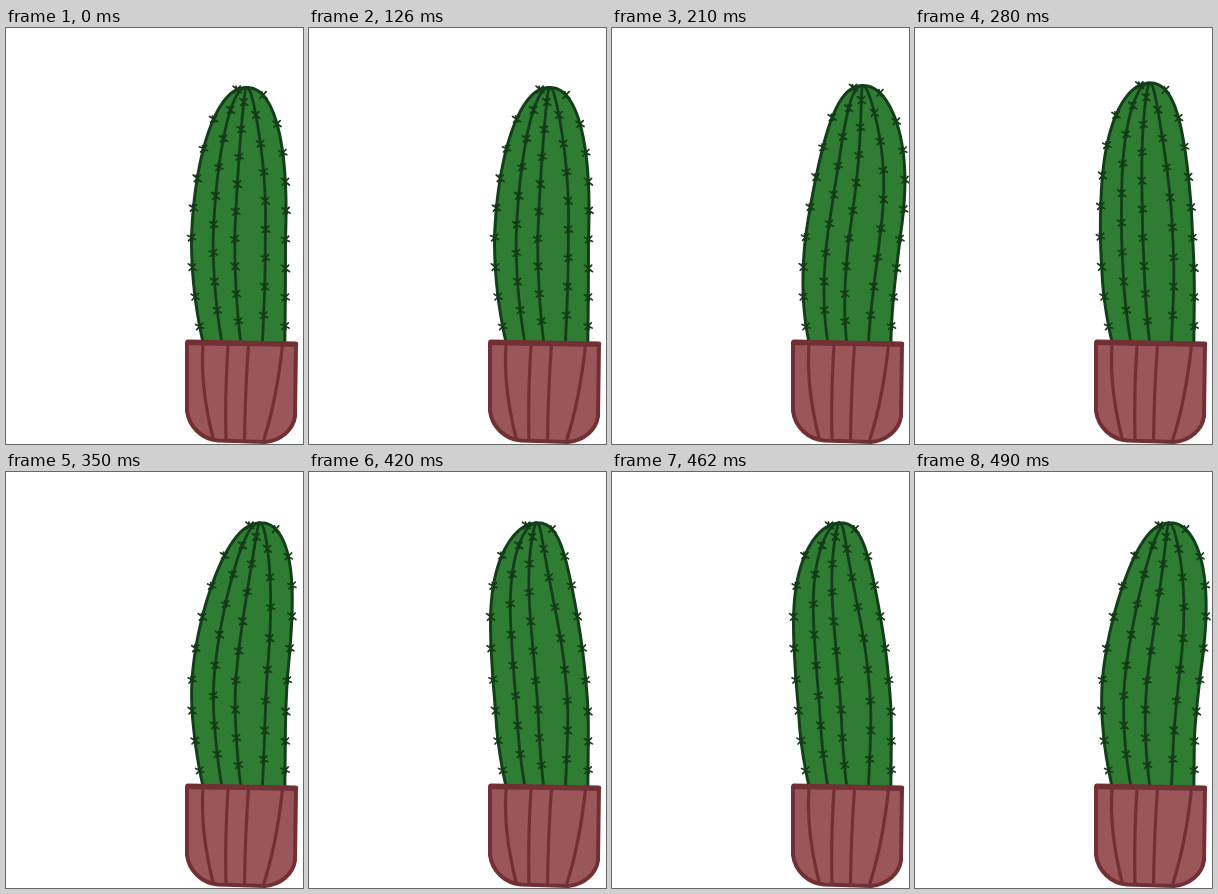
An HTML page for the animation above (0.56 s loop, 297x416 px).

```html
<!DOCTYPE html>
<html lang="en">
<head>
<meta charset="utf-8">
<title>Swaying cactus</title>
<style>
  html, body { margin: 0; width: 100%; height: 100%; overflow: hidden; background: #fff; }
  svg { display: block; width: 100%; height: 100%; }
  path { stroke-linecap: round; stroke-linejoin: round; }
  .body { fill: #2f7d32; stroke: #123f1a; stroke-width: 3; }
  .rib { fill: none; stroke: #123f1a; stroke-width: 2.8; }
  .spines { fill: none; stroke: #143a18; stroke-width: 1.7; }
  .pot { fill: #9b5659; stroke: #733034; stroke-width: 4; }
  .groove { fill: none; stroke: #733034; stroke-width: 3.2; }
  .rim { fill: none; stroke: #733034; stroke-width: 5.5; }
</style>
</head>
<body>
<svg viewBox="0 0 297 416" preserveAspectRatio="none">
  <g id="plant"></g>
  <path class="pot" d="M181 315L181 383C183 399 196 411 212 412.500L259 414C275 412.500 287 402 289 388.500L290 316Z"/>
  <path class="groove" d="M197 317C195 345 199 378 207 410M222 317C220 350 219 380 220 411M242.500 317C240 350 239 380 238.500 412M276.500 317C273 350 266 386 258 411"/>
  <path class="rim" d="M182 314.300L289.500 316.300"/>
</svg>
<script>
const TOP = 59.5, BELLY = 212, FOOT = 316, RADIUS = 47;

// side: -1 left edge to 1 right edge; spines start at `first` and repeat every `gap`.
const lines = [
  { side: -1, curl: 0, first: 61.5, gap: 29.6 },
  { side: -0.54, curl: 0, first: 82, gap: 28.6 },
  { side: -0.08, curl: 0, first: 74, gap: 27.4 },
  { side: 0.57, curl: 0.2, first: 87, gap: 28.6 },
  { side: 1, curl: 0, first: 67, gap: 28.9 }
];

// lean: sideways reach; pivot: height where bending begins; bow: how far the bend curls over.
const poses = [
  { hold: 210, lean: 0, pivot: 250, bow: 1.9, lift: 0, spread: 0 },
  { hold: 70, lean: 13.8, pivot: 320, bow: 2.1, lift: 2.1, spread: 0.5 },
  { hold: 70, lean: -7, pivot: 250, bow: 1.9, lift: 5, spread: -1.3 },
  { hold: 70, lean: 13.3, pivot: 250, bow: 1.4, lift: 9.6, spread: 1 },
  { hold: 70, lean: -15, pivot: 250, bow: 1.9, lift: 9.6, spread: -1 },
  { hold: 70, lean: 13.5, pivot: 280, bow: 1.7, lift: 9.6, spread: 2.5 }
];
const LOOP = poses.reduce((sum, p) => sum + p.hold, 0);

const swell = (y, pivot, bow) =>
  Math.sin(bow * Math.max(0, (pivot - y) / (pivot - 60))) ** 2;

// Upright outline: a domed upper part, tapering gently below the belly.
function profile(y) {
  const up = Math.max(0, (BELLY - y) / (BELLY - TOP));
  const down = Math.max(0, (y - BELLY) / 88);
  return {
    axis: 232.5 + 8 * up ** 1.2 + 4 * down ** 2,
    half: RADIUS * Math.max(0, 1 - up ** 2.2) ** (1 / 2.2) - 4.5 * down ** 2
  };
}

function place(line, y, pose) {
  const { axis, half } = profile(y);
  const side = line.side - line.curl * ((215 - y) / 130) ** 2;
  const off = side * half, tilt = off / RADIUS;
  const bulge = Math.max(0, Math.sin((y - 60) / 200 * Math.PI));
  return [
    axis + off + pose.lean * swell(y, pose.pivot, pose.bow) + pose.spread * tilt * bulge,
    y - pose.lift * swell(y, 270, 1.9) * (1 + 0.3 * tilt)
  ];
}

// Samples are denser near the tip, where the dome turns quickly.
function trace(line, pose, steps = 48) {
  return Array.from({ length: steps + 1 }, (_, i) =>
    place(line, TOP + (FOOT - TOP) * (i / steps) ** 2, pose));
}

function spines(line, pose) {
  let d = "";
  for (let y = line.first, i = 0; y < 300; y += line.gap, i++) {
    const [px, py] = place(line, y, pose), tilt = (i % 3 - 1) * 0.7;
    d += `M${px - 4} ${py - 2.6 + tilt}l8 ${5.2 - 2 * tilt}` +
         `M${px - 3} ${py + 3.3}l6.2 -6.6M${px - 1} ${py - 3.2}l2 6.2`;
  }
  return d;
}

function add(parent, tag, cls, d) {
  const el = document.createElementNS("http://www.w3.org/2000/svg", tag);
  if (cls) el.setAttribute("class", cls);
  if (d) el.setAttribute("d", d);
  return parent.appendChild(el);
}

const toPath = pts => "M" + pts.join("L");

function drawPlant(pose) {
  const g = add(document.getElementById("plant"), "g");
  const [left, ...rest] = lines.map(line => trace(line, pose));
  const right = rest.pop();
  add(g, "path", "body", toPath([...left.reverse(), ...right]));
  for (const rib of rest) add(g, "path", "rib", toPath(rib));
  add(g, "path", "spines", lines.map(line => spines(line, pose)).join(""));
  return g;
}

// Each pose is shown only during its own hold.
const starts = poses.map((_, i) => poses.slice(0, i).reduce((sum, p) => sum + p.hold, 0));
poses.forEach((pose, i) => {
  const frames = [...starts, LOOP].map((t, j) =>
    ({ offset: t / LOOP, opacity: i === j ? 1 : 0, easing: "step-end" }));
  drawPlant(pose).animate(frames, { duration: LOOP, iterations: Infinity });
});
</script>
</body>
</html>
```
